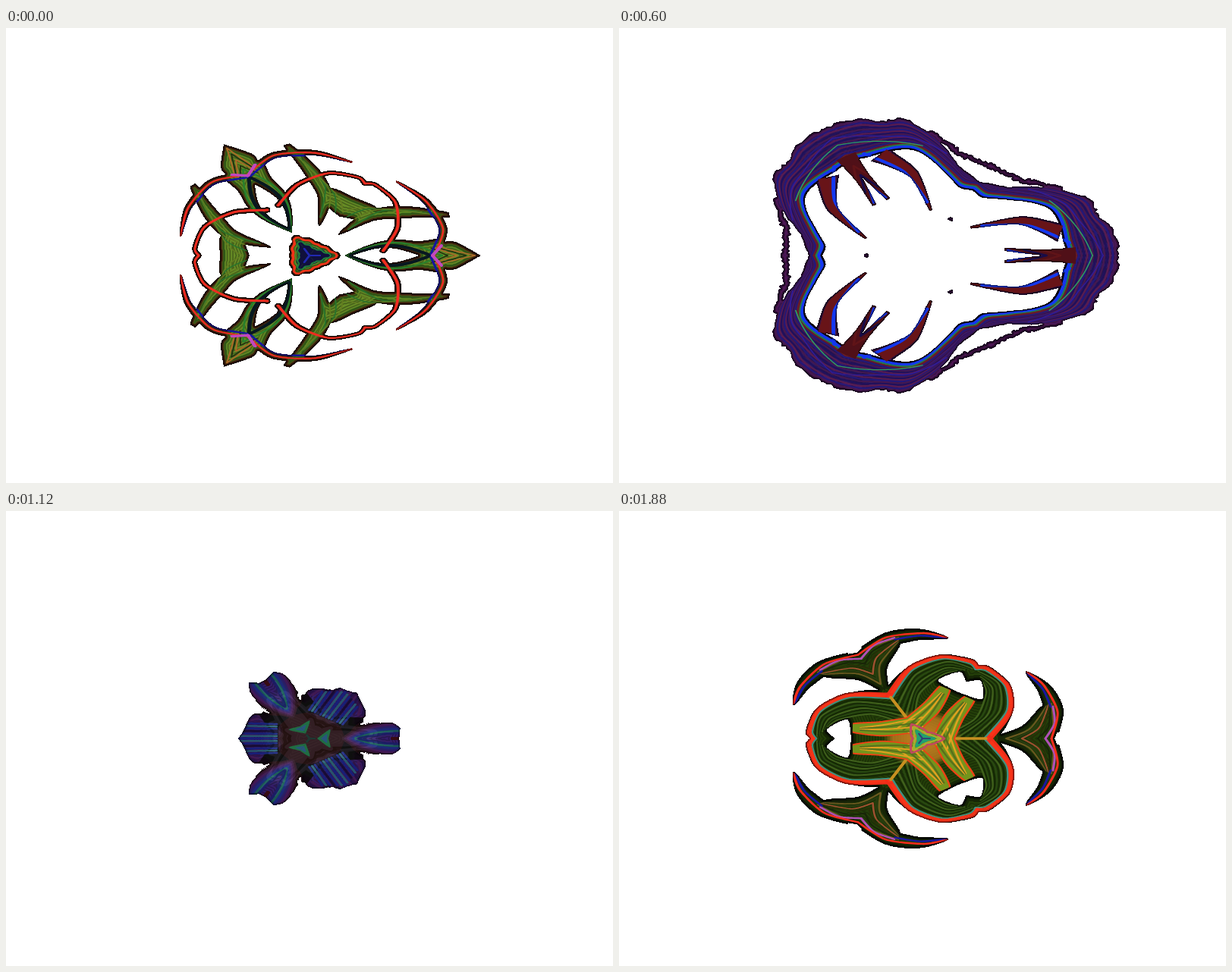
Animation, 800 px wide and 600 px high, one loop 1.92 s. Source, as an HTML page with a canvas:

```html
<!DOCTYPE html>
<html lang="en">
<head>
<meta charset="utf-8">
<title>Kaleidoscope</title>
<style>
html, body { margin: 0; width: 100%; height: 100%; overflow: hidden; background: #fff; }
canvas { display: block; width: 800px; height: 600px; }
</style>
</head>
<body>
<canvas id="stage" width="800" height="600"></canvas>
<script>
const LOOP = 1920, STEP = 40;
const X0 = 190, Y0 = 100, W = 500, H = 400, N = W * H;
const CX = 400, CY = 300, SQUASH = 0.75, SAMPLES = 48;

let seed = 7;
const random = () => (seed = seed * 16807 % 2147483647) / 2147483647;
const mix = (a, b, k) => a + (b - a) * k;

// ---- Geometry: every helper returns a list of points in one sector ----

// Smooth line through a few key points, "x,y x,y ...".
function curve(text) {
  const p = text.split(' ').map(s => s.split(/[,:]/).map(Number));
  const n = p.length - 1, tension = 0.4, line = [];
  for (let i = 0; i <= SAMPLES; i++) {
    const u = i / SAMPLES * n, k = Math.min(n - 1, Math.floor(u)), t = u - k;
    const a = p[Math.max(0, k - 1)], b = p[k], c = p[k + 1], d = p[Math.min(n, k + 2)];
    const h = t * t * (3 - 2 * t);
    line.push([0, 1].map(j => mix(b[j], c[j], h) +
      tension * ((c[j] - a[j]) * t * (1 - t) ** 2 - (d[j] - b[j]) * t * t * (1 - t))));
  }
  return line;
}

// Line given by "angle:radius" knots from an arm (0) to the gap between arms (60).
const polar = (knots, grow = 0, jag = 0) => curve(knots).map(([deg, r]) => {
  const a = deg * Math.PI / 180, q = r + grow + jag * (random() - 0.5) * (r / 80) ** 2;
  return [CX + q * Math.cos(a), CY - q * Math.sin(a) * SQUASH];
});
const sector = (...args) => [...polar(...args), [CX, CY]];

// Half a lens lying on the horizontal axis.
const leaf = (x0, x1, height, skew = 1) => Array.from({ length: SAMPLES + 1 }, (_, i) => {
  const u = i / SAMPLES;
  return [mix(x0, x1, u), CY - height * Math.sin(Math.PI * u ** skew)];
});

// Tapering band along a spine: width at both ends plus a bulge between.
function horn(w0, bulge, w1, text) {
  const s = curve(text), left = [], right = [];
  s.forEach(([x, y], i) => {
    const a = s[Math.max(0, i - 1)], b = s[Math.min(SAMPLES, i + 1)], u = i / SAMPLES;
    const half = (mix(w0, w1, u) + bulge * Math.sin(Math.PI * u)) / 2;
    const len = Math.hypot(b[0] - a[0], b[1] - a[1]) || 1;
    const nx = -(b[1] - a[1]) / len * half, ny = (b[0] - a[0]) / len * half;
    left.push([x + nx, y + ny]);
    right.unshift([x - nx, y - ny]);
  });
  return [...left, ...right];
}

// ---- Parts: the first three shape the silhouette, the others colour it ----
const fill = shape => ({ kind: 'fill', shape });
const cut = shape => ({ kind: 'cut', shape });
const pen = (width, shape) => ({ kind: 'pen', width, shape });
const tint = (color, shape) => ({ kind: 'tint', color, shape });
const ink = (color, width, shape) => ({ kind: 'ink', color, width, shape });
const glow = (color, r) => ({ kind: 'glow', color, r });
// Lines blending from one curve to another, cycling through the colours.
const weave = (colors, width, count, from, to) => Array.from({ length: count }, (_, i) =>
  ink(colors[i % colors.length], width, from.map(([x, y], j) => {
    const k = count > 1 ? i / (count - 1) : 0;
    return [mix(x, to[j][0], k), mix(y, to[j][1], k)];
  })));

const lobe = '254,300 249,290 262,262 300,243 345,240';
const rim = '514,202 553,228 576,265 564,300';

function lattice() {
  const claw = '246,207 268,243 298,273 349,289';
  const core = '0:41 8:39 15:33 32:31 46:27 60:27';
  return [
    fill(leaf(446, 585, 21)), fill(curve('550,300 572,284 592,282 626,300')),
    cut(leaf(457, 544, 10)),
    pen(7, curve(lobe)), fill(horn(2, 4, 11, rim)),
    fill(horn(8, 15, 1, claw)), fill(curve('282,300 283,274 310,278 321,300')),
    fill(horn(6, 2, 10, '515,282 545,286 575,282')),
    fill(sector(core)),
    ink('#28802c', 2, leaf(448, 575, 17)), ink('#081820', 4, leaf(454, 560, 13)),
    weave(['#b06828', '#203010'], 1.5, 4, curve('618,300 575,290'), curve('582,300 560,290')),
    weave(['#28742c', '#647c20'], 1.5, 4, curve('262,238 285,268 335,284'), curve('256,222 290,284 312,300')),
    ink('#f02c20', 3, curve(lobe)),
    ink('#1414a0', 3, curve('518,207 550,232 571,265 560,298')),
    ink('#f02820', 2.5, curve(rim)), ink('#c048c0', 4, curve('574,287 562,300')),
    tint('#10103c', sector(core, -11)), ink('#f03418', 3, polar(core, -5)),
    ink('#20803c', 2, polar(core, -13)), ink('#2028b0', 2, curve('400,300 414,300'))
  ];
}

function wreath() {
  const outer = '0:231 14:230 27:211 35:197 60:196';
  const inner = '0:97 9:128 17:157 26:167 36:162 43:152 47:163 60:160';
  const cord = '0:214 12:210 25:191 40:176 60:167';
  const claw = '297,262 266,275 256,300';
  return [
    fill(sector(outer, 0, 0.5)), cut(sector(inner)), cut(curve('570,300 580,276 601,268 608,300')),
    fill(horn(1, 4, 24, claw)), fill(sector('0:31 20:20 40:17 60:20', 0, 8)),
    weave(['#582418', '#b06040', '#904838', '#c06c48', '#6c3428'], 3, 9, polar(outer, -3), polar(cord, 5)),
    tint('#544428', curve('497,300 540,281 562,258 568,275 535,300')),
    weave(['#584428', '#806050', '#443420'], 2.5, 5, polar('0:101 9:132 17:161 27:171'),
      polar('0:132 9:160 17:181 32:178')),
    weave(['#a058a8', '#804850'], 2.5, 2, polar('6:168 17:186 32:186 45:171'), polar('8:162 17:179 32:180')),
    weave(['#4048b0', '#1c20e8', '#2024d8'], 2, 4, polar(cord, 4), polar(cord, -4)),
    ink('#080808', 6, curve('535,300 571,299')),
    tint('#8c2414', horn(1, 4, 24, claw)), tint('#284830', horn(0, 3, 16, '290,265 265,278 259,300')),
    tint('#284020', sector('0:28 20:18 60:17'))
  ];
}

function crown() {
  const outer = '0:259 11:255 17:243 24:242 34:211 47:165 60:150';
  const inner = '0:192 8:187 26:186 41:149 52:129 60:132';
  const tooth = '582,270 530,254 463,263';
  return [
    fill(sector(outer, 0, 0.5)), cut(sector(inner)),
    pen(6, polar('32:216 40:198 47:184 60:181', 0, 1)),
    fill(horn(26, -3, 3, tooth)), fill(horn(12, 0, 4, '602,295 560,296 508,292')),
    pen(4, curve('325,300 327,299')),
    weave(['#441850', '#241878', '#581c50', '#20105c'], 2.5, 14, polar(outer, -4), polar(inner, 14)),
    ink('#301c98', 1.5, polar('0:238 16:216 26:208 40:182')),
    weave(['#080414', '#1438f0', '#1438f0', '#208048', '#681c28'], 2.5, 5, polar(inner, 2), polar(inner, 11)),
    ink('#30a060', 1.5, polar('0:224 14:209 30:193')),
    tint('#681418', horn(20, -3, 2, tooth)),
    ink('#1438f0', 4, curve('594,283 540,261 478,261')),
    tint('#501018', horn(12, 0, 3, '602,295 560,296 508,292')),
    weave(['#1438f0', '#180c48', '#601418'], 2.5, 3, curve('512,293 545,300'), curve('555,292 582,300'))
  ];
}

function blades() {
  const spoke = '242,210 262,252 295,270 333,263 360,276 358,300 264,300 269,287 248,245';
  return [
    fill(leaf(443, 620, 28, 0.82)), fill(curve(spoke)), fill(curve('358,300 360,281 390,258 360,268')),
    cut(leaf(527, 562, 4)),
    weave(['#301870', '#6c2888', '#481c70'], 2.5, 8, curve('250,228 280,277 330,270'), curve('268,298 310,295 345,298')),
    tint('#080408', curve('330,264 358,270 389,260 361,282 358,300 345,285')),
    weave(['#1c34d8', '#38a0c0', '#1c34d8', '#181050'], 2.5, 7, curve('357,281 320,280'), curve('357,300 305,300')),
    weave(['#401428', '#581c58', '#6c2890', '#4030b0', '#2444d8', '#20a090', '#2030b0'], 3, 7,
      leaf(444, 614, 24, 0.82), leaf(464, 565, 7)),
    ink('#5c1010', 4, curve('509,300 527,300'))
  ];
}

function fur() {
  const edge = '0:104 8:108 15:88 24:73 33:78 44:65 60:65';
  return [
    fill(sector(edge, -2, 19)),
    weave(['#141a14', '#34343a', '#3c3c44', '#1c201c'], 4, 6, polar(edge, -14), polar(edge, -44)),
    weave(['#101418', '#282838'], 1.5, 3, curve('462,297 510,297'), curve('462,287 510,286')),
    tint('#10d078', curve('410,300 427,288 425,300')), tint('#20a0e8', curve('415,300 423,294 423,300')),
    ink('#0c6858', 2, curve('400,300 407,300'))
  ];
}

function flower() {
  const petal = '303,300 302,289 335,269 375,270 400,300';
  const spur = '516,258 504,276 482,290 450,298';
  return [
    fill(curve(petal)), fill(horn(6, 4, 22, spur)), fill(curve('488,300 475,276 470,248 440,260 400,300')),
    tint('#000', horn(6, 4, 26, spur)), tint('#284830', curve('308,300 307,289 335,273 378,276 400,300')),
    ink('#e02810', 2, curve('306,300 304,289 335,271 372,272')),
    weave(['#38d028', '#48b828', '#284838', '#70a838', '#305040'], 2, 7,
      curve('309,300 306,289 336,273 390,279'), curve('336,300 342,292 352,290 380,296')),
    weave(['#38d028', '#d82810', '#d8c820', '#58a828'], 2, 5,
      curve('518,259 498,284 445,299'), curve('512,262 490,279 455,287')),
    glow('#e8e020', 54),
    weave(['#e8dc20', '#78d020', '#f0d820'], 2.5, 6, curve('350,275 378,276 425,300'), curve('352,297 385,297 420,282')),
    ink('#e07018', 1.5, curve('351,278 352,300')),
    tint('#38cc20', sector('0:11 60:10'))
  ];
}

function bloom() {
  const spur = '536,212 560,234 573,262 568,290';
  const stamen = '308,286 348,287 400,280';
  return [
    fill(curve('251,300 246,290 260,260 300,240 362,240 400,300')),
    fill(horn(2, 10, 24, spur)), fill(curve('484,300 530,284 560,256 582,275 574,300')),
    cut(curve('285,300 274,288 301,275 306,300')),
    weave(['#142804', '#40601c', '#182c08', '#284810'], 2, 10,
      curve('259,298 264,270 305,250 365,254'), curve('275,285 290,275 335,268 385,284')),
    weave(['#409080', '#f83418', '#f83418', '#f02c18'], 2.5, 4,
      curve('260,300 255,290 266,264 303,246 358,247'), curve('252,300 248,290 262,260 300,241 360,241')),
    weave(['#182408', '#6c5820', '#283c10', '#a05030', '#283008'], 2, 7,
      curve('500,300 535,288 562,258'), curve('562,300 572,284 570,254')),
    ink('#1818a0', 3, curve('538,214 558,234 569,258')),
    ink('#b050b8', 3, curve('572,258 574,280 562,300')),
    ink('#f82c1c', 3, curve('538,212 560,230 578,265 570,300')),
    glow('#c88020', 52), ink('#c89020', 3, curve('430,300 484,300')),
    tint('#f04014', horn(13, 3, 22, stamen)), tint('#74941c', horn(9, 3, 19, stamen)),
    weave(['#e0a020', '#58701c'], 2, 4, curve('318,286 355,281 400,272'), curve('318,289 355,291 400,290')),
    weave(['#c04860', '#a0b030', '#20a070'], 2.5, 3, polar('0:29 20:20 60:12'), polar('0:16 20:8 60:6')),
    tint('#20a070', sector('0:15 20:7 60:6')), ink('#304078', 1.5, curve('400,300 410,300'))
  ];
}

// Shades run inward from the edge, one per "step" pixels.
const poses = [
  { at: 0, step: 3, stripe: 12, draw: lattice, shades: ['#100404', '#48200c', '#306018', '#587820'] },
  { at: 240, step: 4, stripe: 8, draw: wreath, shades: ['#280c08', '#783424', '#3c2014', '#080808'] },
  { at: 600, step: 4, stripe: 10, draw: crown, shades: ['#200430', '#441448', '#3c1860', '#281858'] },
  { at: 960, step: 5, stripe: 12, draw: blades, shades: ['#30080c', '#481a40', '#501c80', '#4828a0'] },
  { at: 1280, step: 9, stripe: 5, draw: fur, shades: ['#140818', '#1c201e', '#2c2c30', '#3a3a40'] },
  { at: 1600, step: 4, stripe: 12, draw: flower, shades: ['#000', '#081004', '#284020'] },
  { at: 1880, step: 4, stripe: 10, draw: bloom, shades: ['#000', '#101c04', '#203808'] }
];

// ---- Rendering ----
const context = (w, h) => {
  const c = document.createElement('canvas');
  c.width = w; c.height = h;
  return c.getContext('2d', { willReadFrequently: true });
};
const rgb = s => {
  if (s.length < 7) s = '#' + [...s.slice(1)].map(c => c + c).join('');
  return [1, 3, 5].map(i => parseInt(s.slice(i, i + 2), 16));
};

function sixfold(g, shape, draw) {
  const path = new Path2D();
  shape.forEach(([x, y]) => path.lineTo(x, y));
  for (let i = 0; i < 6; i++) {
    g.save();
    g.translate(CX - X0, CY - Y0);
    g.scale(1, SQUASH);
    g.rotate((i >> 1) * Math.PI * 2 / 3);
    g.scale(1, (i & 1 ? -1 : 1) / SQUASH);
    g.translate(-CX, -CY);
    draw(path);
    g.restore();
  }
}

function stroke(g, color, width, shape) {
  g.strokeStyle = color;
  g.lineWidth = width;
  g.lineJoin = g.lineCap = 'round';
  sixfold(g, shape, p => g.stroke(p));
}

function flood(g, color, shape) {
  g.fillStyle = color;
  sixfold(g, shape, p => g.fill(p));
}

function shine(g, color, r) {
  g.save();
  g.translate(CX - X0, CY - Y0);
  g.scale(1, SQUASH);
  const grad = g.createRadialGradient(0, 0, 0, 0, 0, r);
  grad.addColorStop(0, color);
  grad.addColorStop(0.75, color + 'c0');
  grad.addColorStop(1, color + '00');
  g.fillStyle = grad;
  g.fillRect(-r, -r, 2 * r, 2 * r);
  g.restore();
}

// Two-pass distance to the nearest cell where test is true.
function distance(test) {
  const d = new Float32Array(N), R = Math.SQRT2;
  for (let i = 0; i < N; i++) d[i] = test(i) ? 0 : 999;
  const sweep = (i, s) => {
    d[i] = Math.min(d[i], d[i - s] + 1, d[i - s * W] + 1,
      d[i - s * (W + 1)] + R, d[i - s * (W - 1)] + R);
  };
  for (let y = 1; y < H - 1; y++) for (let x = 1; x < W - 1; x++) sweep(y * W + x, 1);
  for (let y = H - 2; y > 0; y--) for (let x = W - 2; x > 0; x--) sweep(y * W + x, -1);
  return d;
}

function build(pose) {
  const parts = pose.draw().flat(), m = context(W, H);
  for (const { kind, width, shape } of parts) {
    m.globalCompositeOperation = kind === 'cut' ? 'destination-out' : 'source-over';
    if (kind === 'fill' || kind === 'cut') flood(m, '#000', shape);
    if (kind === 'pen') stroke(m, '#000', width, shape);
  }
  const mask = m.getImageData(0, 0, W, H).data;
  const solid = i => mask[i * 4 + 3] > 110;
  const inner = distance(i => !solid(i)), outer = distance(solid);
  pose.field = inner.map((v, i) => v > 0 ? v - 0.5 : 0.5 - outer[i]);

  const g = context(W, H), img = g.createImageData(W, H);
  const shades = pose.shades.map(rgb), last = shades.length - 1;
  for (let i = 0; i < N; i++) {
    const v = Math.min(last, inner[i] / pose.step), k = Math.min(last - 1, Math.floor(v));
    const wave = 1 + Math.sin(inner[i] * 1.7) * pose.stripe / 60;
    for (let c = 0; c < 3; c++)
      img.data[i * 4 + c] = mix(shades[k][c], shades[k + 1][c], v - k) * wave;
    img.data[i * 4 + 3] = 255;
  }
  g.putImageData(img, 0, 0);
  for (const { kind, color, width, shape, r } of parts) {
    if (kind === 'tint') flood(g, color, shape);
    if (kind === 'ink') stroke(g, color, width, shape);
    if (kind === 'glow') shine(g, color, r);
  }
  pose.paint = g.getImageData(0, 0, W, H).data;
}

poses.forEach(build);

const stage = document.getElementById('stage').getContext('2d');
const layer = context(W, H), out = layer.createImageData(W, H);

// Silhouettes melt into each other through their distance fields.
function render(t) {
  let n = poses.length - 1;
  while (poses[n].at > t) n--;
  const A = poses[n], B = poses[(n + 1) % poses.length];
  const k = (t - A.at) / ((B.at || LOOP) - A.at), px = out.data;
  for (let i = 0, j = 0; i < N; i++, j += 4) {
    const d = mix(A.field[i], B.field[i], k);
    px[j + 3] = d > 0 ? 255 : 0;
    if (d <= 0) continue;
    const edge = Math.min(1, 0.35 + d * 0.25);
    for (let c = 0; c < 3; c++) px[j + c] = mix(A.paint[j + c], B.paint[j + c], k) * edge;
  }
  layer.putImageData(out, 0, 0);
  const swell = A.draw === crown ? 1 + 0.07 * Math.sin(k * Math.PI) : 1;
  stage.setTransform(1, 0, 0, 1, 0, 0);
  stage.fillStyle = '#fff';
  stage.fillRect(0, 0, 800, 600);
  stage.imageSmoothingEnabled = false;
  stage.translate(CX, CY);
  stage.scale(swell, swell);
  stage.drawImage(layer.canvas, X0 - CX, Y0 - CY);
}

let start = null, shown = -1;
function tick(now) {
  if (start === null) start = now;
  const t = Math.floor(((now - start) % LOOP) / STEP) * STEP;
  if (t !== shown) render(shown = t);
  requestAnimationFrame(tick);
}
render(0);
requestAnimationFrame(tick);
</script>
</body>
</html>
```
